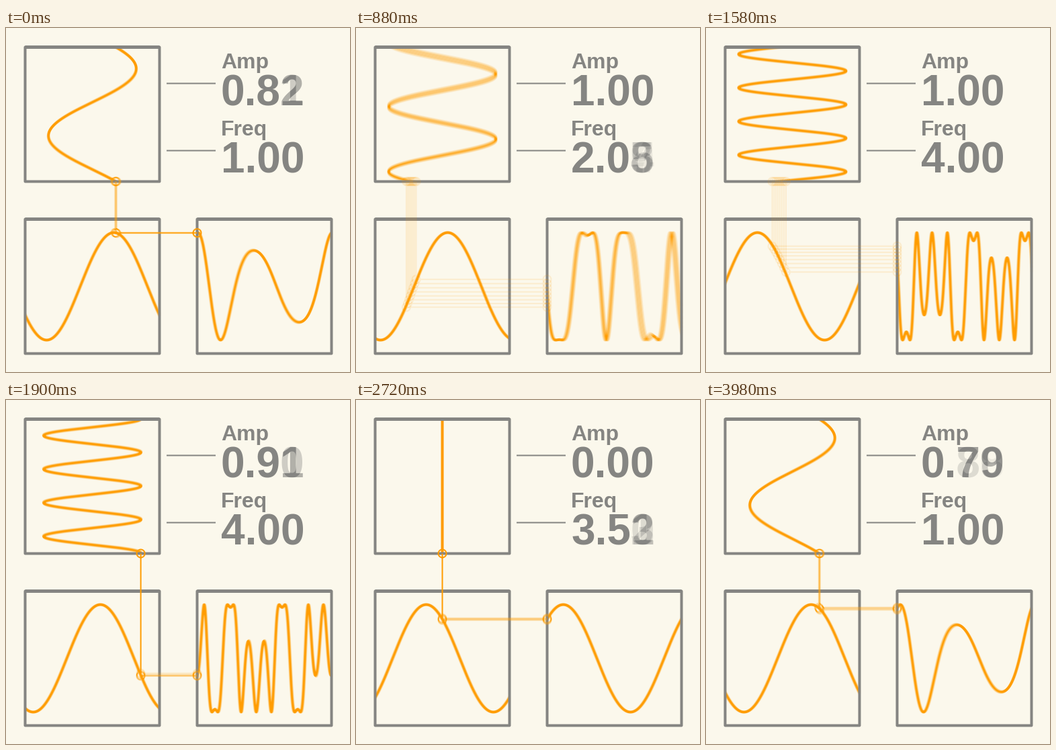
A matplotlib script that plays this animation: 512 by 512 pixels, repeating every 4 s.

```python
import numpy as np
import matplotlib.pyplot as plt
from matplotlib.animation import FuncAnimation

plt.rcParams["path.snap"] = False
plt.rcParams["font.family"] = "Liberation Sans"

SIZE, DPI = 512, 100
FRAMES, STEP = 200, 0.02          # 4 s loop
SAMPLES, SHUTTER = 8, 0.6         # motion blur
START = -0.096
BG, GRAY, ORANGE = "#fbf8ec", "#858582", "#ff9c00"
NEAR, FAR, HALF, REACH = 128.5, 384.5, 100, 80
EASE_LEN = 0.96
TAU = 2 * np.pi
GAP = [np.nan]


def px(n):
    return n * 72 / DPI


def ramp(t, mid):
    p = np.clip((t - mid) / EASE_LEN + 0.5, 0, 1)
    return (1 - np.cos(np.pi * p)) / 2


def amp_at(t):
    return 1 - ramp(t, -0.3) * (t < 1) if False else (
        ramp(t, -0.3) - ramp(t, 2.1) + ramp(t, 3.7))


def freq_at(t):
    return 1 + 3 * (ramp(t, 0.88) - ramp(t, 2.857))


def chain(*parts):
    """Join point runs into one path with breaks between them."""
    xs, ys = [], []
    for x, y in parts:
        xs += [x, GAP]
        ys += [y, GAP]
    return np.concatenate(xs), np.concatenate(ys)


def square(cx, cy):
    s = np.array([-1, 1, 1, -1, -1, 1]) * HALF
    return cx + s, cy + np.array([-1, -1, 1, 1, -1, -1]) * HALF


angle = np.linspace(0, TAU, 33)
RING = 6 * np.cos(angle), 6 * np.sin(angle)


def ring(x, y):
    return x + RING[0], y + RING[1]


fig = plt.figure(figsize=(SIZE / DPI, SIZE / DPI), dpi=DPI, facecolor=BG)


def full_axes():
    ax = fig.add_axes([0, 0, 1, 1])
    ax.set_xlim(0, SIZE)
    ax.set_ylim(SIZE, 0)
    ax.axis("off")
    return ax


def label(ax, x, y, text, size):
    return ax.text(x, y, text, color=GRAY, size=px(size), weight="bold",
                   ha="left", va="baseline")


# Hidden stage: drawn several times per frame and averaged.
stage = full_axes()
stage.set_visible(False)
paper = stage.add_patch(plt.Rectangle((-2, -2), SIZE + 4, SIZE + 4, fc=BG, lw=0))
style = dict(solid_joinstyle="round", solid_capstyle="butt")
waves, = stage.plot([], [], color=ORANGE, lw=px(4), **style)
boxes, = stage.plot(*chain(square(NEAR, NEAR), square(NEAR, FAR), square(FAR, FAR)),
                    color=GRAY, lw=px(4), **style)
links, = stage.plot([], [], color=ORANGE, lw=px(2), **style)
amp_text = label(stage, 320, 115.5, "", 64)
freq_text = label(stage, 320, 215.5, "", 64)
layers = [paper, waves, boxes, links, amp_text, freq_text]

# Visible screen with the blurred picture and the fixed labels.
screen = full_axes()
picture = screen.imshow(np.full((SIZE, SIZE, 3), 255, np.uint8),
                        extent=(0, SIZE, SIZE, 0), interpolation="nearest",
                        aspect="auto")
for y, name in ((82.5, "Amp"), (182.5, "Freq")):
    screen.plot([240, 311], [y, y], color=GRAY, lw=px(2))
    label(screen, 320, y - 22.5, name, 32)

pos = np.linspace(-0.5, 0.5, 501)
ahead = pos + 0.5


def pose(t):
    amp, freq = amp_at(t), freq_at(t)

    def sway(when, w):
        return REACH * amp * np.sin(TAU * freq * (when - w))

    def heave(when, w):
        return FAR + REACH * np.sin(TAU * (when - w))

    span = 2 * HALF
    later = t + ahead
    mixed = heave(later, sway(later, 0.5) / span)
    waves.set_data(*chain(
        (NEAR + sway(t, pos), NEAR + span * pos),
        (NEAR + span * pos, heave(t, pos)),
        (FAR + span * pos, mixed)))

    x, y = NEAR + sway(t, 0.5), mixed[0]
    floor, wall = NEAR + HALF, FAR - HALF
    links.set_data(*chain(
        ([x, x], [floor, y]), ([x, wall], [y, y]),
        ring(x, floor), ring(x, y), ring(wall, y)))
    amp_text.set_text(f"{abs(amp):.2f}")
    freq_text.set_text(f"{freq:.2f}")


def update(i):
    renderer = fig.canvas.get_renderer()
    total = np.zeros((SIZE, SIZE, 3), np.uint16)
    for j in range(SAMPLES):
        pose(START + STEP * (i + SHUTTER * (j + 0.5) / SAMPLES))
        for layer in layers:
            layer.draw(renderer)
        total += np.asarray(renderer.buffer_rgba())[..., :3]
    picture.set_data((total // SAMPLES).astype(np.uint8))
    return picture,


anim = FuncAnimation(fig, update, frames=FRAMES, interval=1000 * STEP,
                     repeat=True, repeat_delay=0, blit=False)
plt.show()
```
